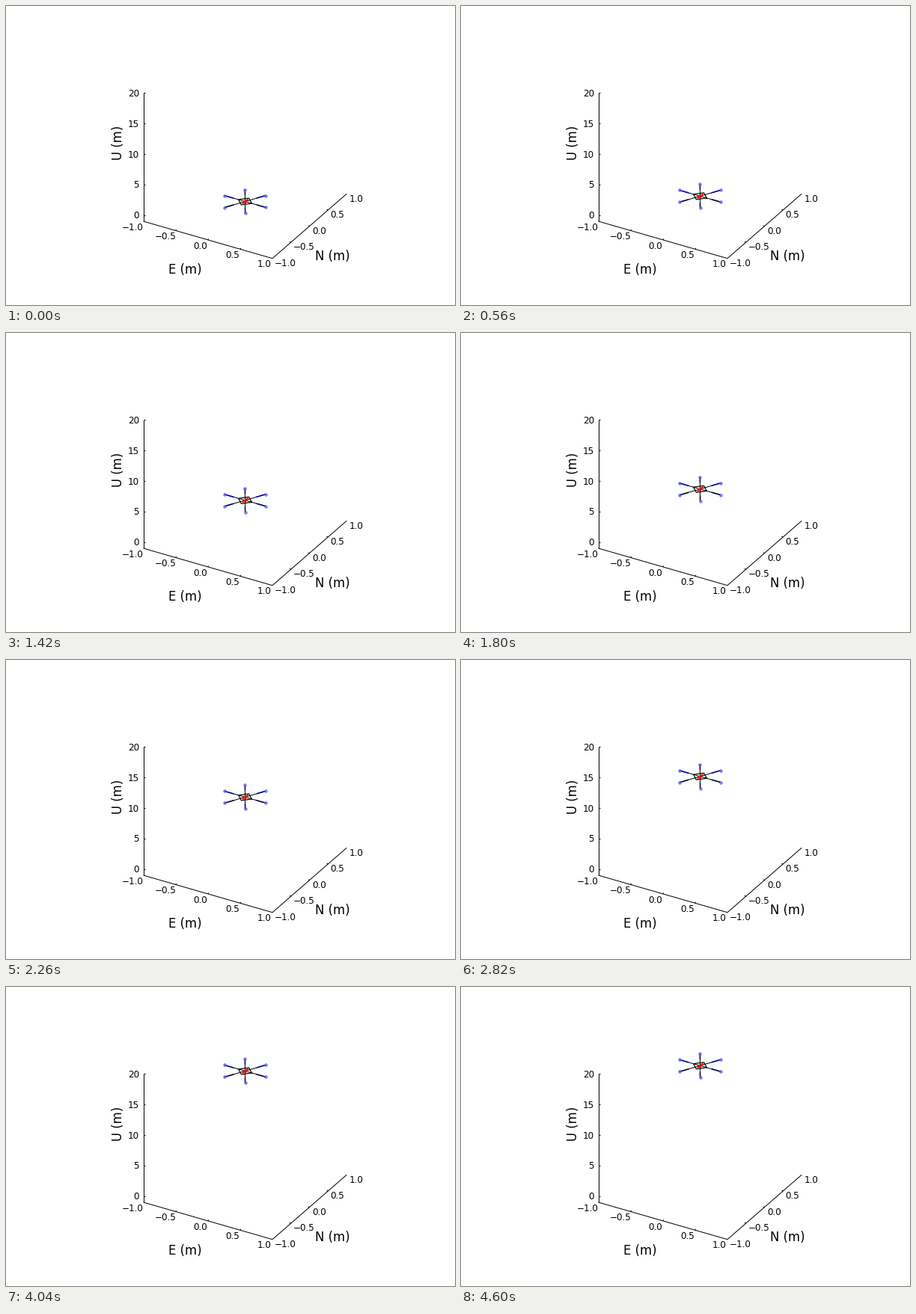
Animation of 600 by 400 pixels, one loop 4700 ms. Source, as a matplotlib script:

```python
import numpy as np
import matplotlib.pyplot as plt
from matplotlib.animation import FuncAnimation

W, H, DPI = 600, 400, 100
PX = 72 / DPI  # points per pixel
STEP = 20
TICKS = 235

plt.rcParams["font.family"] = "DejaVu Sans"
fig = plt.figure(figsize=(W / DPI, H / DPI), dpi=DPI, facecolor="white")
ax = fig.add_axes([0, 0, 1, 1])
ax.set_xlim(0, W)
ax.set_ylim(H, 0)
ax.axis("off")

# Screen directions of one metre along east, north and up
ORIGIN = np.array([319.5, 261.6])
EAST = np.array([86.25, 24.75])
NORTH = np.array([49.5, -43.25])
UP = np.array([0, -8.19])


def project(e, n, u=0.0):
    return ORIGIN + e * EAST + n * NORTH + u * UP


def line(p, q, color="black", width=1.0, **kw):
    return ax.plot([p[0], q[0]], [p[1], q[1]], color=color, lw=width * PX,
                   solid_capstyle="butt", **kw)[0]


def label(x, y, text, size=12, ha="center", **kw):
    ax.text(x, y, text, fontsize=size * PX, ha=ha, va="baseline", **kw)


def draw_axes():
    corner_w, corner_s, corner_e = (183.5, 288), (356, 337.7), (455.3, 251.2)
    line(corner_w, (183.5, 116))
    line(corner_w, corner_s)
    line(corner_s, corner_e)

    for u in range(0, 21, 5):
        y = 279.8 - 8.19 * u
        line((183.5, y), (185.5, y))
        label(177.8, y + 4.6, str(u), ha="right")

    for i, v in enumerate(np.linspace(-1, 1, 5)):
        text = f"{v:.1f}".replace("-", "\u2212")
        f = i / 4
        e = np.array(corner_w) + f * np.subtract(corner_s, corner_w)
        n = np.array(corner_s) + f * np.subtract(corner_e, corner_s)
        if 0 < i < 4:
            line(e, e + (1, -1.5))
            line(n, n + (-2, -0.6))
        shift = -3.5 if v < 0 else 0
        label(e[0] - 10.5 + shift, e[1] + 11.7, text)
        label(n[0] + 3.2, n[1] + 10.3, text, ha="left")

    label(239, 358, "E (m)", 16.5)
    label(436.5, 340, "N (m)", 16.5)
    label(149.6, 201.7, "U (m)", 16.5, rotation=90)


class Craft:
    """Six-armed drone whose parts all share one vertical offset."""

    ARM = 0.32
    BODY = 0.103

    def __init__(self):
        self.parts = []
        for deg in range(0, 360, 60):
            a = np.radians(deg)
            d = np.array([np.cos(a), np.sin(a)])
            tip = project(*(self.ARM * d))
            self.add(line(ORIGIN, tip, zorder=3))
            tint = (0, 0, 0.7) if deg in (60, 180) else (0.03, 0.03, 0.27)
            self.add(line(project(*(0.55 * self.ARM * d)), tip, tint, 1.6, zorder=4))
            self.add(ax.plot(*tip, "o", ms=4.6 * PX, color=(0.35, 0.35, 0.95),
                             alpha=0.75, mew=0, zorder=5)[0])

        r = self.BODY
        square = np.array([project(*p) for p in
                           [(r, 0), (0, r), (-r, 0), (0, -r), (r, 0)]])
        self.add(ax.plot(*square.T, color="black", lw=1.2 * PX, zorder=6)[0])

        self.add(line(ORIGIN + (-3.5, 3), ORIGIN + (4, -3), "red", 1.8, zorder=7))
        head = ORIGIN + np.array([(4, -3.3), (-4, 0.6), (1.2, 3), (4, -3.3)])
        self.add(ax.fill(*head.T, color="red", lw=0, zorder=7)[0])

    def add(self, artist):
        poly = not hasattr(artist, "get_xydata")
        base = artist.get_xy().copy() if poly else artist.get_xydata().copy()
        self.parts.append((artist, base, poly))

    def climb(self, height):
        for artist, base, poly in self.parts:
            pts = base + height * UP
            if poly:
                artist.set_xy(pts)
            else:
                artist.set_data(*pts.T)
        return [p[0] for p in self.parts]


def pose_index(tick):
    # Poses last 20, 20 and 100 ms in turn
    cycle, rest = divmod(tick + 1, 7)
    return min(3 * cycle + min(rest, 2) - 1, 98)


def update(tick):
    s = (pose_index(tick) + 1) / 100
    return craft.climb(19.1 * s * s * (3 - 2 * s))


draw_axes()
craft = Craft()
anim = FuncAnimation(fig, update, frames=TICKS, interval=STEP,
                     repeat=True, repeat_delay=0, blit=False)
plt.show()
```
